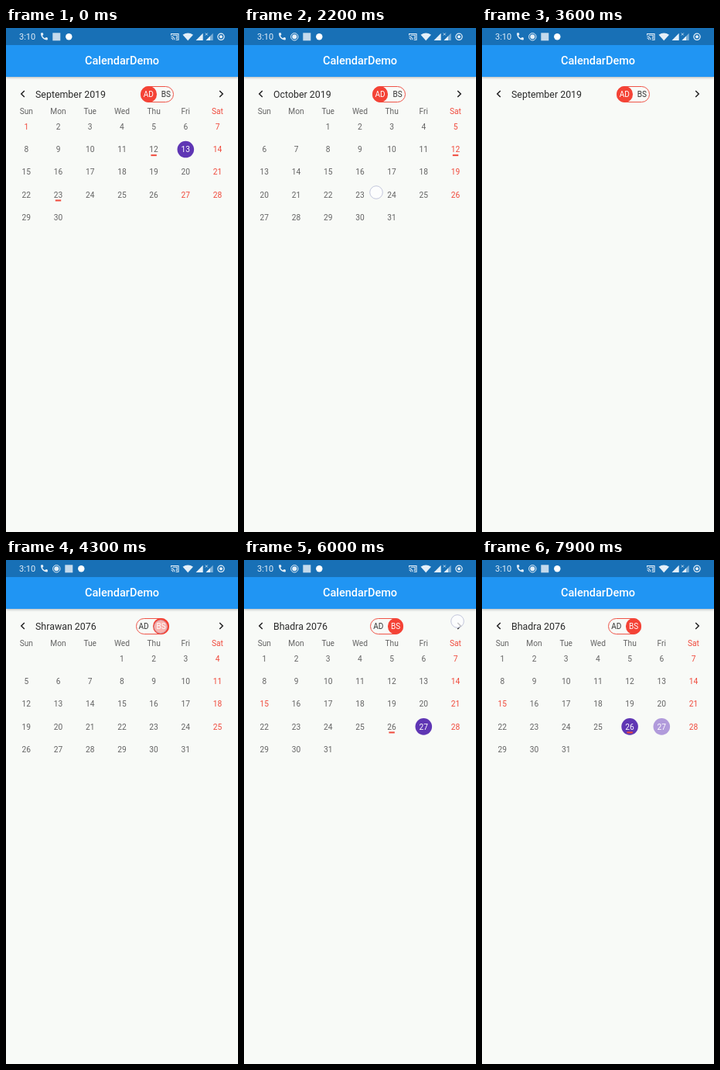
An HTML page for the animation above (8000 ms loop, 300 px wide and 650 px high).

```html
<!DOCTYPE html>
<html lang="en">
<head>
<meta charset="utf-8">
<title>CalendarDemo</title>
<style>
  html, body { margin: 0; width: 100%; height: 100%; overflow: hidden; background: #f8faf7; }
  body { position: relative; font-family: Roboto, sans-serif; }
  svg { position: absolute; left: 0; top: 0; width: 300px; height: 650px; overflow: hidden; }
  .bar { position: absolute; left: 0; top: 0; width: 300px; height: 63px; background: #2095f3;
    box-shadow: 0 1px 3px rgba(0, 0, 0, .28); }
  .status { height: 22px; background: #1870b6; }
  .bar h1 { margin: 0; font: 500 14.5px/42px Roboto, sans-serif; color: #fff; text-align: center; }
  .head { position: absolute; left: 38px; top: 75px; width: 224px; height: 20.5px;
    display: flex; justify-content: space-between; }
  .title { font-size: 12.4px; line-height: 21px; color: #2b2b2b; white-space: nowrap; }
  .pill { position: relative; box-sizing: border-box; width: 43px; height: 20.5px;
    border: 1px solid #ef5347; border-radius: 10.5px; display: flex; }
  .pill span { width: 20.5px; height: 20.5px; margin: -1px 0 0 -1px; border-radius: 50%; flex: none;
    font-size: 10px; line-height: 21px; text-align: center; color: #333; }
  .pill span + span { margin-left: 2px; }
  .pill .on { background: #f44336; color: #fff; }
  .cal text { font-size: 10.2px; text-anchor: middle; fill: #636363; }
  .cal .red { fill: #f04a3c; }
  .cal .white { fill: #fff; }
</style>
</head>
<body>
<div class="bar"><div class="status"></div><h1>CalendarDemo</h1></div>
<div class="head">
  <div class="title"></div>
  <div class="pill"><span>AD</span><span>BS</span></div>
  <i></i>
</div>
<svg viewBox="0 0 300 650">
  <g fill="#e4eff8">
    <text x="17" y="15.4" font-size="11">3:10</text>
    <path d="M45 7.2 q0-.9.9-.9 h1.6 q.6 0 .8 1.6 q.1.8-.3 1.1 l-1 .9 q1.2 2.3 3.3 3.4 l1-1.1 q.4-.4 1.1-.2 q1.5.3 1.5 1 v1.7 q0 .8-.9.8 C48.6 15.500 45 11.500 45 7.200z"/>
    <g id="rec">
      <circle cx="65.300" cy="11.300" r="4.700" fill="none" stroke="#e4eff8"/>
      <circle cx="65.300" cy="11.300" r="3"/>
    </g>
    <g id="apps">
      <rect x="60.300" y="6.300" width="10" height="10" fill="#c4daec"/>
      <circle cx="81.300" cy="11.300" r="4.200" fill="#fff"/>
    </g>
    <g fill="none" stroke="#e4eff8" stroke-width="1.100">
      <path d="M213.600 9.500V7.500H223V15.200H219.600M213.600 11q4 0 4.200 4.300M213.600 13q2 .2 2.200 2.300M215.500 9.300H221V13.200H219.500"/>
      <circle cx="278" cy="11.300" r="4.100" stroke-width="1.300"/>
    </g>
    <circle cx="278" cy="11.300" r="2"/>
    <path d="M228.500 8.800Q235.200 4.400 242 8.800L235.200 16.200z"/>
    <path d="M254.700 6.800V16H245.500z"/>
    <path d="M267.700 6.800V16H258.500z" opacity=".5"/>
    <path d="M264 10.500V16H258.500z"/>
    <path d="M257.800 6.500l3 3m0-3l-3 3" stroke="#e4eff8" stroke-width=".8"/>
  </g>
  <path d="M23.800 81l-4 4 4 4M276.200 81l4 4-4 4" fill="none" stroke="#222" stroke-width="1.500"/>
  <g class="cal"></g>
  <circle id="touch" r="8.300" fill="#fdfdff" fill-opacity=".75" stroke="#c3c7dc"/>
</svg>
<script>
const LOOP = 8000, STEP = 100, SLIDE = 300;
const PURPLE = '#5f36b4', LILAC = '#b19bdb', RED = '#f04a3c';
const $ = s => document.querySelector(s);

// lead: blank cells before day 1
const months = {
  aug: { title: 'August 2019', lead: 4, days: 31 },
  sep: { title: 'September 2019', lead: 0, days: 30, red: [1, 27], mark: [12, 23], today: 13 },
  oct: { title: 'October 2019', lead: 2, days: 31, mark: [12] },
  shr: { title: 'Shrawan 2076', lead: 3, days: 31, bs: true },
  bha: { title: 'Bhadra 2076', lead: 0, days: 31, red: [15], mark: [26], today: 27, bs: true },
  ash: { title: 'Ashwin 2076', lead: 3, days: 30, red: [10], mark: [6, 25], bs: true }
};

// [time, month, side the page slides in from]
const pages = [
  [0, 'sep', 0], [1500, 'oct', 1], [2700, 'sep', -1], [3700, 'aug', -1],
  [4300, 'shr', 0], [5200, 'bha', 1], [6100, 'ash', 1], [6900, 'bha', -1]
];

// swipes: [time, offset] points, held until the page switches
const swipes = [
  [[1000, 0], [1100, -33.6], [1400, -310]],
  [[2200, 0], [2300, 24], [2600, 310]],
  [[3300, 0], [3600, 310]]
];

// [from, until, x, y, dx per step, opacity]
const touches = [
  [1100, 1300, 209, 202, -75, 1],
  [2200, 2500, 171, 212, 42, 1],
  [3300, 3500, 120, 208, 75, 1],
  [4200, 4500, 200, 86, 0, .8],
  [5000, 5200, 276, 77, 0, 1],
  [5200, 5300, 276, 77, 0, .5],
  [6000, 6200, 276, 79, 0, 1],
  [6800, 7000, 18, 83, 0, 1],
  [7700, 7900, 191, 214, 0, .8]
];

const colX = c => 26.3 + 41.2 * c;
const rowY = r => 127.4 + 29.15 * r;
const label = (x, y, s, cls = '') => `<text x="${x}" y="${y + 3.7}" class="${cls}">${s}</text>`;
const dot = (x, y, fill) => `<circle cx="${x}" cy="${y}" r="10.8" fill="${fill}"/>`;
const bar = (x, y) => `<rect x="${x - 3.7}" y="${y + 6.6}" width="7.4" height="2" fill="${RED}"/>`;

function drawMonth({ lead, days, red = [], mark = [], today }, selected) {
  let out = 'Sun Mon Tue Wed Thu Fri Sat'.split(' ')
    .map((s, c) => label(colX(c), 107, s, c === 6 ? 'red' : '')).join('');
  for (let d = 1; d <= days; d++) {
    const cell = lead + d - 1, c = cell % 7;
    const x = colX(c), y = rowY(Math.floor(cell / 7));
    const disc = d === selected ? PURPLE : d === today ? LILAC : null;
    if (disc) out += dot(x, y, disc);
    if (mark.includes(d)) out += bar(x, y);
    out += label(x, y, d, disc ? 'white' : c === 6 || red.includes(d) ? 'red' : '');
  }
  return out;
}

function swipeAt(t, since) {
  const path = swipes.filter(s => s[0][0] >= since && s[0][0] <= t).pop();
  if (!path) return 0;
  const i = path.findIndex(p => p[0] > t);
  if (i < 0) return path[path.length - 1][1];
  const [t0, x0] = path[i - 1], [t1, x1] = path[i];
  return x0 + (x1 - x0) * (t - t0) / (t1 - t0);
}

const cal = $('.cal'), touch = $('#touch'), [ad, bs] = document.querySelectorAll('.pill span');
let shown = '';

function render(t) {
  const [since, key, side] = pages.filter(p => p[0] <= t).pop();
  const month = months[key];
  const selected = t >= 7800 ? 26 : month.today;
  if (shown !== key + selected) {
    shown = key + selected;
    cal.innerHTML = drawMonth(month, selected);
    $('.title').textContent = month.title;
    ad.className = month.bs ? '' : 'on';
    bs.className = month.bs ? 'on' : '';
  }
  const left = Math.max(0, 1 - (t - since) / SLIDE);
  const dx = side * 346 * left ** 1.66 + swipeAt(t, since);
  cal.setAttribute('transform', `translate(${dx} 0)`);

  const hit = touches.find(h => t >= h[0] && t < h[1]);
  touch.style.opacity = hit ? hit[5] : 0;
  if (hit) {
    touch.setAttribute('cx', hit[2] + hit[4] * (t - hit[0]) / STEP);
    touch.setAttribute('cy', hit[3]);
  }

  const recording = t >= 100;
  $('#rec').style.opacity = recording ? 1 : 0;
  $('#apps').setAttribute('transform', `translate(${recording ? 16 : 0} 0)`);
}

let start;
function tick(now) {
  start ??= now;
  render(Math.floor((now - start) % LOOP / STEP) * STEP);
  requestAnimationFrame(tick);
}
render(0);
requestAnimationFrame(tick);
</script>
</body>
</html>
```
